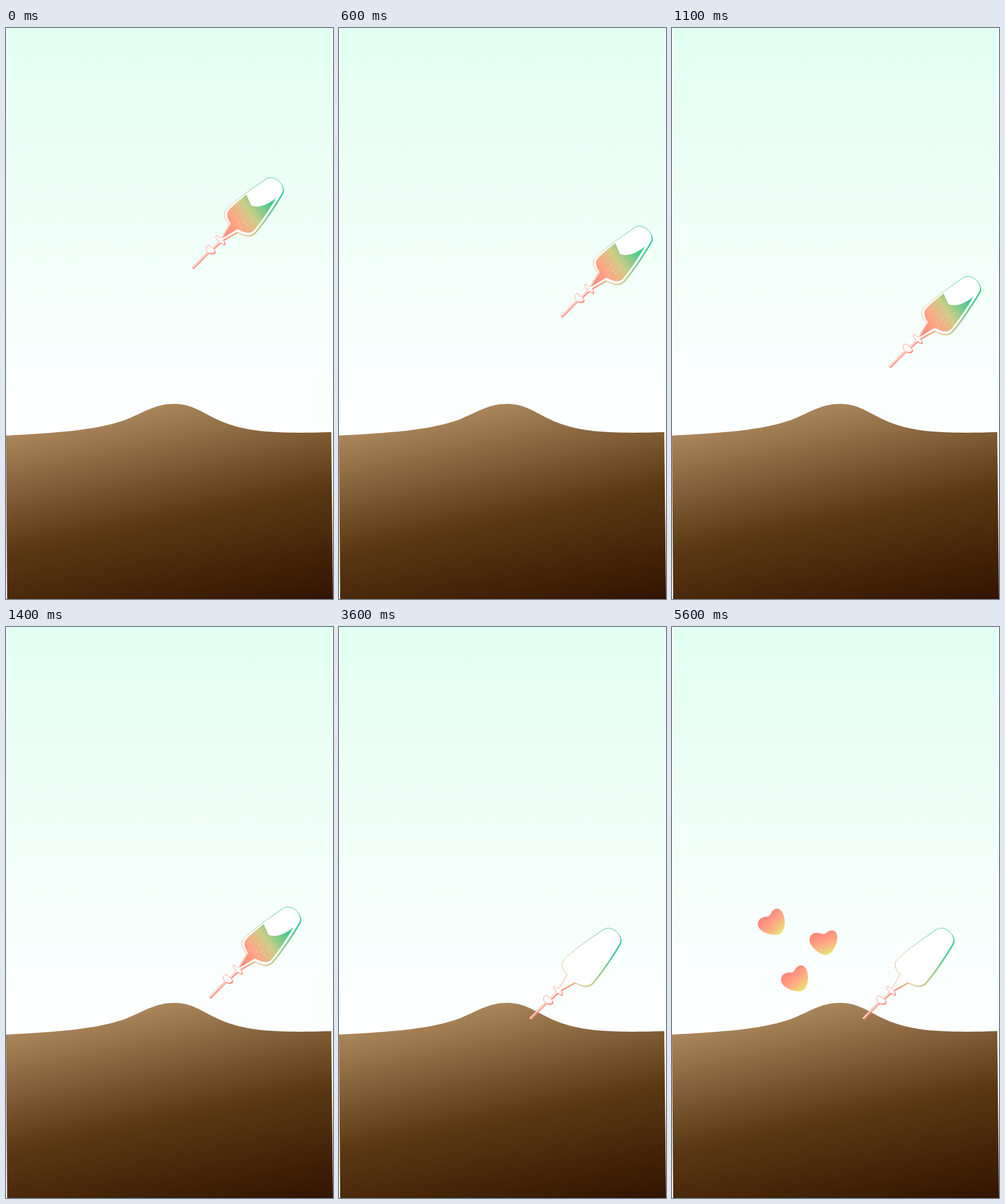
An HTML page that plays this animation: 566x989 px, repeating every 6.1 s.

```html
<!DOCTYPE html>
<html lang="en">
<head>
<meta charset="utf-8">
<title>Watering the soil</title>
<style>
  html, body { margin: 0; height: 100%; overflow: hidden; background: #fff; }
  svg { display: block; width: 100%; height: 100%; }
</style>
</head>
<body>
<svg viewBox="0 0 566 989">
  <defs>
    <linearGradient id="sky" x2="0" y2="1">
      <stop stop-color="#e1fff3"/>
      <stop offset="1" stop-color="#fff"/>
    </linearGradient>
    <linearGradient id="soil" gradientUnits="userSpaceOnUse" x1="200" y1="669" x2="277" y2="1048">
      <stop stop-color="#a9855b"/>
      <stop offset=".5" stop-color="#5a3914"/>
      <stop offset="1" stop-color="#321400"/>
    </linearGradient>
    <linearGradient id="rim" gradientUnits="userSpaceOnUse" x1="370" y1="370" x2="470" y2="300">
      <stop stop-color="#ff8c7c"/>
      <stop offset=".4" stop-color="#d6c887"/>
      <stop offset="1" stop-color="#3bcb8d"/>
    </linearGradient>
    <linearGradient id="juice" gradientUnits="userSpaceOnUse" x1="370" y1="370" x2="470" y2="300">
      <stop offset=".12" stop-color="#ff8c7c"/>
      <stop offset=".34" stop-color="#ffa585"/>
      <stop offset=".58" stop-color="#cfcc87"/>
      <stop offset=".92" stop-color="#3bcb8d"/>
    </linearGradient>
    <linearGradient id="love" gradientUnits="userSpaceOnUse" x1="-6" y1="-12" x2="7" y2="21">
      <stop stop-color="#ff8c7c"/>
      <stop offset=".4" stop-color="#ffa585"/>
      <stop offset="1" stop-color="#e9e277"/>
    </linearGradient>
    <path id="flask" d="M323 416.5 L321.5 415 L349 388 C345 384 345 376.5 350 376.5 C354 376.5 355 379 357 381.5
      L366.500 372 L368 368 C362 364 362 360 365 360 C369 360 368 365 373.500 363 L387 339
      C379 334 376 322 379.500 317 C389 303 428 277 450 261.500 C458 256.500 468 260.500 474 267
      C479 273 481 280 478.500 285 C468 304 443 341 430 355 C421 363 411 359 400 353.500
      L376 367 C380 373 378 376 375 374.500 C372 372 370 371.500 368 373.500
      L359 382 C364 387 361 391 355 390.500 C351 390 351 388 349 390 Z"/>
    <path id="heart" d="M2 -14.500 C6 -16 8 -20.500 15 -20.500 C22 -20.500 24.500 -14 24 -6 C23 7 14 22 4 22
      C-4 22 -24 9 -24 -4 C-24 -13 -18 -16.500 -11 -16.500 C-5 -16.500 -3 -13 2 -14.500 Z"/>
  </defs>

  <rect x="2" width="562" height="720" fill="url(#sky)"/>
  <path fill="url(#soil)" d="M0 706 C90 701 150 697 200 681 C235 669 255 651 291 651
    C328 651 345 672 385 686 C430 702 490 702 563 700 L566 989 H2 Z"/>

  <g id="bottle">
    <use href="#flask" x="1.600" y="1.800" fill="url(#rim)"/>
    <use href="#flask" fill="#fff" stroke="url(#rim)" stroke-width=".9"/>
    <g id="liquid">
      <path fill="url(#juice)" d="M416 288.500 L424.500 307.500 Q443 314 467.500 294.500
        C458 311 442 335 431 348.500 Q424 358 411 353 L400.500 348.500 L374 364.500 L389 338.500
        C383 331 381 322 384.500 317 C389 310 405 298 416 288.500 Z"/>
      <path id="bubbles" fill="none" stroke="#fff" stroke-width="1.300" stroke-linecap="round"
        d="M409 325h0M425 328h0M434 323h0M403 337h0M411 337h0M417 341h0M424 337h0M406 346h0M414 334h0"/>
    </g>
  </g>

  <g fill="url(#love)">
    <use class="heart" href="#heart" transform="translate(213.500 611) rotate(-20)"/>
    <use class="heart" href="#heart" transform="translate(262 546)"/>
    <use class="heart" href="#heart" transform="translate(173.500 513.500) rotate(-25)"/>
  </g>
</svg>
<script>
  const LOOP = 6100, STEP = 100;
  const bottle = document.getElementById('bottle');
  const liquid = document.getElementById('liquid');
  const hearts = document.querySelectorAll('.heart');
  const clamp = v => Math.max(0, Math.min(1, v));
  const bezier = (t, a, b, c) =>
    3 * (1 - t) ** 2 * t * a + 3 * (1 - t) * t * t * b + t ** 3 * c;

  function draw(now) {
    const time = Math.floor(now % LOOP / STEP) * STEP;

    // swing out to the right, then faster down into the hill
    const n = Math.min(16, time / STEP);
    const x = bezier(n / 16, 97, 72, 8);
    const y = n < 7 ? 14 * n : 98 + 18.25 * (n - 7);
    bottle.setAttribute('transform', `translate(${x} ${y})`);

    liquid.setAttribute('opacity', 1 - clamp((time - 2500) / 1100));
    hearts.forEach((heart, i) =>
      heart.setAttribute('visibility', time >= 4600 + 500 * i ? 'visible' : 'hidden'));
  }

  const start = performance.now();
  function tick() {
    draw(performance.now() - start);
    requestAnimationFrame(tick);
  }
  tick();
</script>
</body>
</html>
```
